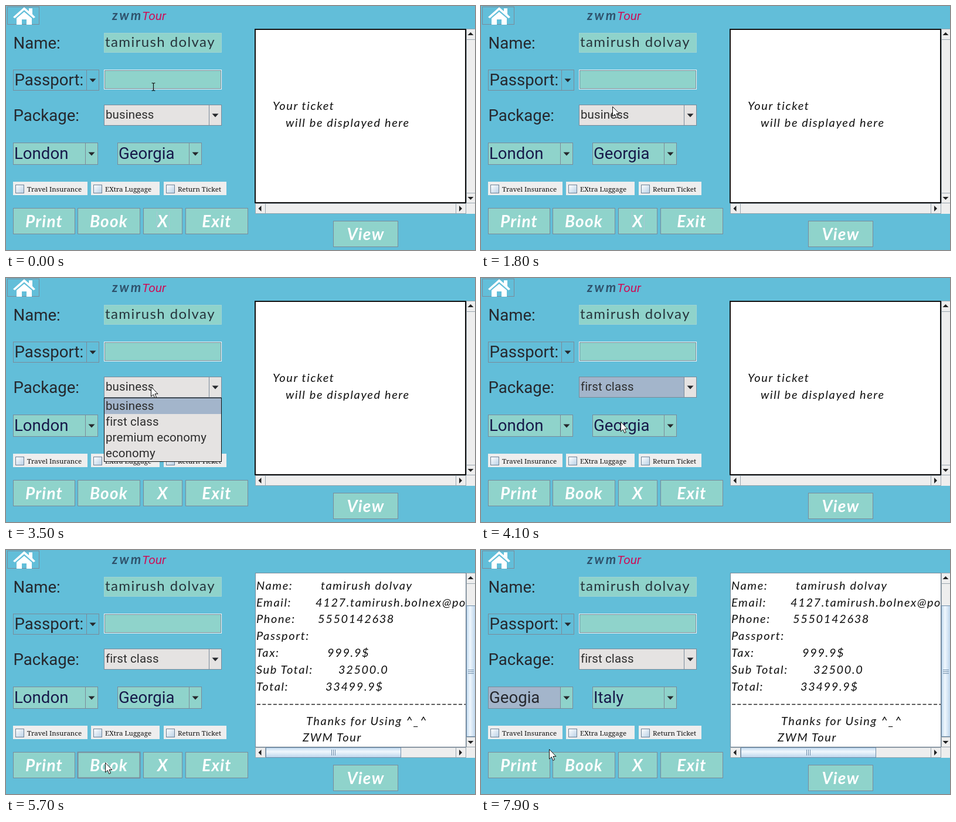
An HTML page that plays this animation: 800 px wide and 418 px high, repeating every 8 s.

```html
<!DOCTYPE html>
<html lang="en">
<head>
<meta charset="utf-8">
<style>
html, body { margin: 0; width: 100%; height: 100%; overflow: hidden; background: #62bed9; }
svg { display: block; width: 800px; height: 418px; }
text { white-space: pre; }
.label { font: 27.6px Roboto, sans-serif; fill: #26282e; }
.city { font: 27.6px Roboto, sans-serif; fill: #171a4a; }
.item { font: 20.5px Roboto, sans-serif; letter-spacing: .1px; fill: #2d2d2d; }
.name { font: 24px Lato, sans-serif; letter-spacing: 1.4px; fill: #26343c; }
.hand { font: italic 20px Lato, sans-serif; letter-spacing: 1.6px; fill: #111; }
.check { font: 11.5px "Noto Serif", serif; fill: #111; }
.button { font: italic bold 28px Lato, sans-serif; letter-spacing: 1.2px; fill: #fff; text-anchor: middle; }
.brand { font: italic bold 22px Lato, sans-serif; letter-spacing: 3px; fill: #2f526c; }
.brand2 { font: italic 21px Roboto, sans-serif; fill: #cc0f58; }
</style>
</head>
<body>
<svg id="stage" viewBox="0 0 800 418">
  <defs>
    <linearGradient id="box" x2="1" y2="1"><stop stop-color="#fff"/><stop offset="1" stop-color="#b9d0e6"/></linearGradient>
    <linearGradient id="thumbV"><stop stop-color="#c0d8ee"/><stop offset=".4" stop-color="#f0f7fd"/><stop offset="1" stop-color="#bcd5ec"/></linearGradient>
    <linearGradient id="thumbH" x2="0" y2="1"><stop stop-color="#c0d8ee"/><stop offset=".4" stop-color="#f0f7fd"/><stop offset="1" stop-color="#bcd5ec"/></linearGradient>
    <clipPath id="page"><rect x="426" y="41" width="358" height="296"/></clipPath>
  </defs>
</svg>
<script>
const GREEN = '#8fd3cb', BLUE = '#62bed9', GREY = '#e5e3e2', PICK = '#a3b5cb', EDGE = '#7a8a99';
const PERSON = 'tamirush dolvay';

const rect = (x, y, w, h, fill, stroke = EDGE, extra = '') =>
  `<rect x="${x + .5}" y="${y + .5}" width="${w - 1}" height="${h - 1}" fill="${fill}" stroke="${stroke}" ${extra}/>`;
const text = (cls, x, y, s, extra = '') => `<text class="${cls}" x="${x}" y="${y}" ${extra}>${s}</text>`;
const path = (d, extra = '') => `<path d="${d}" ${extra}/>`;
const group = (id, body, extra = '') => `<g id="${id}" ${extra}>${body}</g>`;

function combo(x, y, w, h, split, fill, id) {
  const cx = (split + x + w) / 2, cy = y + h / 2;
  return rect(x, y, w, h, fill) +
    rect(x, y, split - x + 1, h, fill, EDGE, id ? `id="${id}"` : '') +
    path(`M${cx - 5.5} ${cy - 2.5}h11l-5.5 6z`, 'fill="#26282c"');
}

function button(id, label, x, y, w) {
  return rect(x, y, w, 45, GREEN, EDGE, `id="${id}"`) +
    text('button', x + w / 2, y + 33, label);
}

function check(id, label, x, w) {
  return rect(x, 301, w, 23, '#eee', '#eee') +
    rect(x + 4, 306, 15, 15, 'url(#box)', '#6c8196', `id="${id}"`) +
    text('check', x + 24, 318, label);
}

function scrollbars() {
  const tri = d => path(d, 'fill="#222"');
  const part = (x, y, w, h) => rect(x, y, w, h, '#eee', '#99a5ae');
  return rect(785, 338, 16, 18, '#eee', '#eee') +
    part(785, 39, 16, 299) + part(785, 39, 16, 19) + part(785, 320, 16, 18) +
    part(425, 338, 360, 18) + part(425, 338, 18, 18) + part(767, 338, 18, 18) +
    tri('M787.5 50h10l-5-5z') + tri('M787.5 327h10l-5 5z') +
    tri('M435.5 342v10l-5-5z') + tri('M773 342v10l5-5z');
}

const rows = [
  [427, 68, 'Name:'], [537, 68, PERSON],
  [427, 97, 'Email:'], [528, 97, '4127.tamirush.bolnex@po'],
  [427, 125, 'Phone:'], [532, 125, '5550142638'],
  [427, 154, 'Passport:'],
  [427, 183, 'Tax:'], [548, 183, '999.9$'],
  [427, 212, 'Sub Total:'], [567, 212, '32500.0'],
  [427, 241, 'Total:'], [545, 241, '33499.9$'],
  [512, 300, 'Thanks for Using ^_^'], [506, 328, 'ZWM Tour']
];

const list = (items, id, cls, x, y, w, step, dy, fill, pad) =>
  group(id, rect(x, y, w, step * items.length + 2, fill, '#111', `stroke-width="${pad}"`) +
    `<rect id="${id}Pick" x="${x + pad}" y="${y + 1}" width="${w - 2 * pad}" height="${step}" fill="${PICK}"/>` +
    items.map((s, i) => text(cls, x + 3, y + dy + i * step, s)).join(''));

document.getElementById('stage').innerHTML +=
  rect(2, 1, 55, 31, BLUE) +
  path('M31 2L39 9V4H45V14L50 19 47 21 31 7 15 21 12 19Z', 'fill="#fff"') +
  path('M18 21L31 10 44 21V32H35V23H27V32H18Z', 'fill="#fff"') +
  text('brand', 181, 24, 'zwm') + text('brand2', 232, 24, 'Tour') +
  text('label', 12.5, 73, 'Name:') + rect(167, 46, 201, 34, GREEN, '#9fd3d2') + text('name', 169, 70, PERSON) +
  combo(12, 109, 147, 36, 137, BLUE) + text('label', 14.5, 136, 'Passport:') +
  rect(167, 109, 201, 34, GREEN, '#f4fafa') + rect(168, 110, 199, 32, GREEN) +
  text('label', 12.5, 197, 'Package:') + combo(167, 169, 201, 36, 346, GREY, 'packBox') +
  text('item', 170, 193, '', 'id="pack"') +
  combo(12, 234, 145, 38, 135, GREEN, 'fromBox') + text('city', 14, 262, '', 'id="from"') +
  combo(190, 234, 144, 38, 312, GREEN) + text('city', 192, 262, '', 'id="to"') +
  check('travel', 'Travel Insurance', 12, 127) + check('luggage', 'EXtra Luggage', 145, 117) +
  check('back', 'Return Ticket', 269, 107) +
  button('print', 'Print', 12, 346, 106) + button('book', 'Book', 122, 346, 107) +
  button('clear', 'X', 234, 346, 67) + button('exit', 'Exit', 306, 346, 107) + button('view', 'View', 558, 368, 111) +
  path('M257.5 352v33M278.5 352v33', 'id="focus" stroke="#a9c6d2"') +
  rect(425, 39, 360, 299, '#fff') + scrollbars() +
  group('empty', '<rect x="425" y="40" width="359" height="297" fill="none" stroke="#111" stroke-width="2"/>' +
    text('hand', 455, 178, 'Your ticket') + text('hand', 477, 207, 'will be displayed here')) +
  group('ticket',
    group('lines', rows.map(r => text('hand', ...r)).join('') +
      path('M428 264.5H784', 'stroke="#222" stroke-width="1.3" stroke-dasharray="6 3.3"'), 'clip-path="url(#page)"') +
    rect(785, 95, 16, 225, 'url(#thumbV)', '#6e8ca8') + rect(443, 338, 231, 18, 'url(#thumbH)', '#6e8ca8') +
    path('M788 205.5h10M788 208.5h10M788 211.5h10M555.5 342v10M558.5 342v10M561.5 342v10', 'stroke="#6e8ca8"')) +
  list(['business', 'first class', 'premium economy', 'economy'], 'packList', 'item', 167, 205, 201, 27, 21, GREY, 1) +
  list(['London', 'Geogia', 'Paris'], 'fromList', 'city', 12, 271, 145, 37.3, 30, GREEN, 2) +
  path('M0 0V16.5L3.8 13 6.3 19 9 17.8 6.5 12H11.5Z', 'id="arrow" fill="#fff" stroke="#111"') +
  path('M-3-6.5H-1L0-5.5 1-6.5H3M0-6V6M-3 6.5H-1L0 5.5 1 6.5H3', 'id="beam" fill="none" stroke="#111" stroke-width="1.2"');

const $ = id => document.getElementById(id);
const show = (id, on) => $(id).style.display = on ? '' : 'none';
const set = (id, name, value) => $(id).setAttribute(name, value);

// Pointer stops: time, x, y
const stops = [
  [0, 251, 138], [500, 251, 138], [1000, 249, 136], [1600, 249, 136], [2300, 125, 320], [2700, 125, 320],
  [3200, 247, 186], [3600, 247, 186], [4000, 238, 246], [4200, 238, 246], [4700, 86, 373], [4900, 86, 373],
  [5200, 172, 372], [5600, 172, 372], [6200, 125, 260], [6700, 125, 260], [7200, 116, 341], [8000, 116, 341]
];

function pointer(t) {
  const i = stops.findIndex(s => s[0] > t);
  const [t0, x0, y0] = stops[i - 1], [t1, x1, y1] = stops[i];
  const k = (t - t0) / (t1 - t0), e = k * k * (3 - 2 * k);
  return [Math.round(x0 + (x1 - x0) * e), Math.round(y0 + (y1 - y0) * e)];
}

// Highlights the list row under the pointer
function hover(id, y, top, step, cls) {
  const labels = [...$(id).querySelectorAll('text')];
  const row = Math.max(0, Math.min(labels.length - 1, Math.floor((y - top) / step)));
  set(id + 'Pick', 'y', top + step * row);
  labels.forEach((el, i) => el.setAttribute('class', i === row && cls === 'city' ? 'label' : cls));
}

function frame(now) {
  const t = Math.floor(now % 8000 / 100) * 100;
  const [x, y] = pointer(t);
  const over = (l, top, w, h) => x >= l && x < l + w && y >= top && y < top + h;
  const packOpen = t >= 3300 && t < 4100, packDone = t >= 4100;
  const fromOpen = t >= 6300 && t < 7400, fromDone = t >= 7400;
  const booked = t >= 5400;

  const typing = over(167, 46, 201, 34) || over(167, 109, 201, 34);
  for (const id of ['arrow', 'beam']) {
    show(id, (id === 'beam') === typing);
    set(id, 'transform', `translate(${x + .5} ${y + .5})`);
  }
  show('focus', t < 3300);
  show('empty', !booked);
  show('ticket', booked);
  show('packList', packOpen);
  show('fromList', fromOpen);
  hover('packList', y, 206, 27, 'item');
  hover('fromList', y, 272, 37.3, 'city');

  $('pack').textContent = packDone ? 'first class' : 'business';
  $('from').textContent = fromDone ? 'Geogia' : 'London';
  $('to').textContent = fromDone ? 'Italy' : 'Georgia';
  set('packBox', 'fill', packDone && !booked ? PICK : GREY);
  set('fromBox', 'fill', fromDone ? PICK : GREEN);
  set('from', 'class', fromDone ? 'label' : 'city');

  set('travel', 'fill', over(12, 301, 127, 23) ? '#c3ccd6' : 'url(#box)');
  set('print', 'stroke-width', over(12, 346, 106, 45) && !fromOpen ? 2 : 1);
  set('book', 'stroke-width', over(122, 346, 107, 45) ? 2 : 1);
  requestAnimationFrame(frame);
}
requestAnimationFrame(frame);
</script>
</body>
</html>
```
